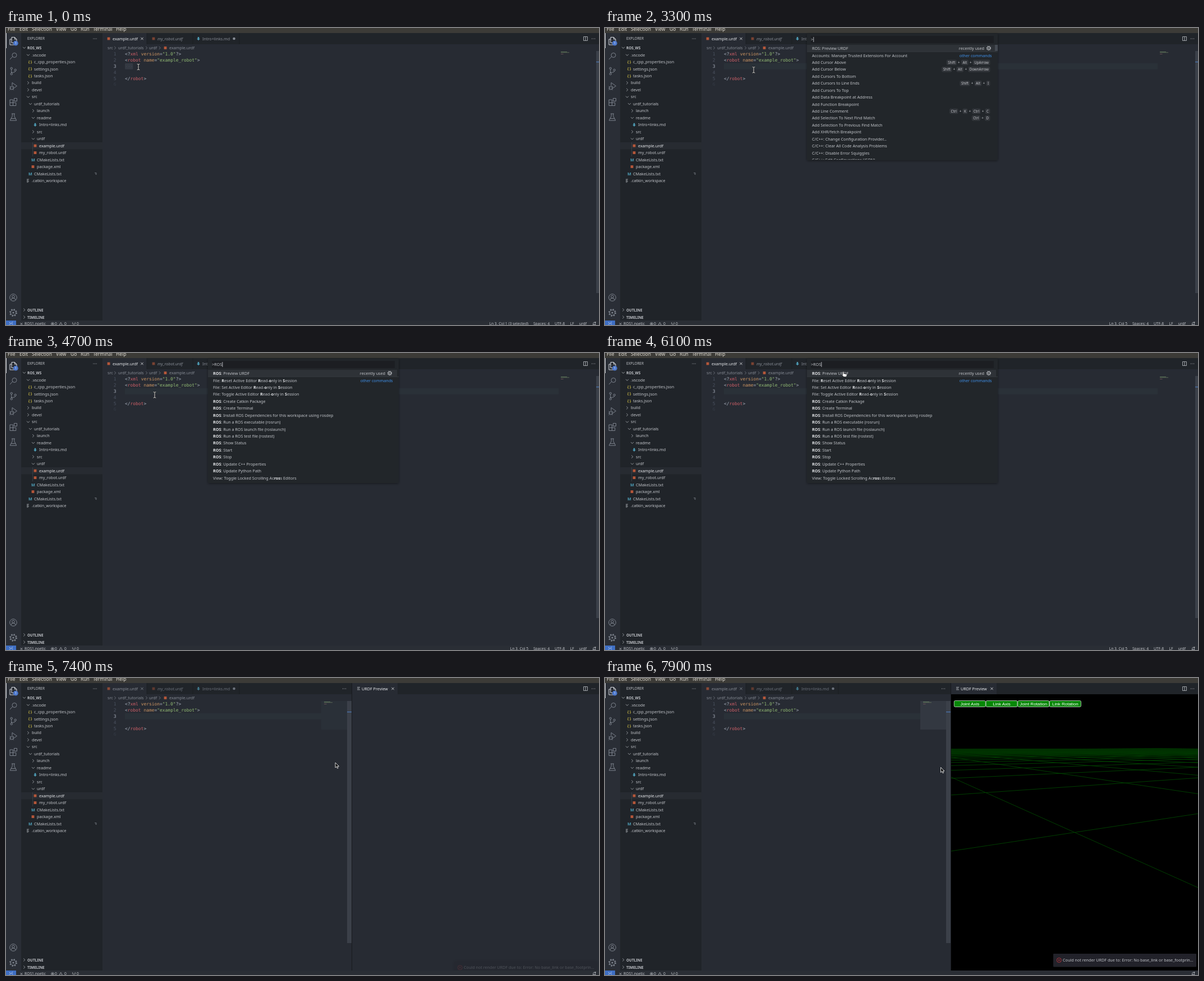
These frames come from a looping animation (1057x530 px, 8 s). An HTML page:

```html
<!DOCTYPE html>
<html lang="en">
<head>
<meta charset="utf-8">
<title>Editor preview</title>
<style>
html, body { margin: 0; width: 100%; height: 100%; overflow: hidden; background: #272b33; }
svg { display: block; width: 1057px; height: 530px; }
text { font-family: "Noto Sans", "Open Sans", sans-serif; font-size: 7.2px; fill: #c1c4c9; white-space: pre; }
.code { font-family: "DejaVu Sans Mono", "Liberation Mono", monospace; font-size: 7.93px; }
.btn { font-family: "Liberation Sans", sans-serif; font-size: 8px; fill: #fff; }
</style>
</head>
<body>
<svg id="stage" viewBox="0 0 1057 530">
  <defs>
    <filter id="shadow" x="-10%" y="-10%" width="120%" height="125%">
      <feDropShadow dx="0" dy="1" stdDeviation="2" flood-color="#000" flood-opacity=".45"/>
    </filter>
    <linearGradient id="haze" x1="0" y1="0" x2="0" y2="1">
      <stop offset="0" stop-opacity=".4"/><stop offset="1" stop-opacity="0"/>
    </linearGradient>
    <clipPath id="listClip"><rect x="360" y="28" width="340" height="207"/></clipPath>
    <clipPath id="viewClip"><rect x="617" y="29" width="440" height="493"/></clipPath>
    <clipPath id="bodyClip"><rect width="1057" height="522"/></clipPath>
  </defs>
  <g id="base"></g>
  <g id="live"></g>
</svg>
<script>
const LOOP = 8000, STEP = 100;
const C = {
  editor: '#272b33', side: '#202429', activity: '#2a2e36', menu: '#3c3b37', row: '#272b31',
  status: '#2a2e35', popup: '#24272b', text: '#c1c4c9', bright: '#e6e8eb', dim: '#868b94', faint: '#6b717b',
  orange: '#b5573a', blue: '#3f8fe8', teal: '#4d9cb5', yellow: '#c2b243'
};
const esc = s => s.replace(/&/g, '&amp;').replace(/</g, '&lt;').replace(/>/g, '&gt;');
const rect = (x, y, w, h, fill, more = '') =>
  `<rect x="${x}" y="${y}" width="${w}" height="${h}" fill="${fill}" ${more}/>`;
const path = (d, stroke, w = 0.8, more = '') =>
  `<path d="${d}" fill="none" stroke="${stroke}" stroke-width="${w}" ${more}/>`;
const dot = (x, y, r, fill, more = '') => `<circle cx="${x}" cy="${y}" r="${r}" fill="${fill}" ${more}/>`;
const raw = (x, y, inner, fill = C.text, more = '') => `<text x="${x}" y="${y}" style="fill:${fill}" ${more}>${inner}</text>`;
const text = (x, y, s, fill, more) => raw(x, y, esc(s), fill, more);
const sized = (x, y, s, size, fill = C.text, extra = '') =>
  `<text x="${x}" y="${y}" style="fill:${fill};font-size:${size}px;${extra}">${esc(s)}</text>`;
const at = (x, y, inner) => `<g transform="translate(${x} ${y})">${inner}</g>`;
const bold = s => esc(s).replace(/\*([^*]+)\*/g, '<tspan font-weight="700" fill="#e4e6e9">$1</tspan>');

const chevron = (x, y, open, col = C.text) =>
  path(open ? `M${x - 2.5} ${y - 1.2}l2.5 2.6l2.5-2.6` : `M${x - 1.3} ${y - 2.5}l2.6 2.5l-2.6 2.5`, col, 0.7);
const cross = (x, y, r = 2.2, col = C.text) =>
  path(`M${x - r} ${y - r}l${2 * r} ${2 * r}m0 ${-2 * r}l${-2 * r} ${2 * r}`, col, 0.8);
const dots = (x, y) => [-2.6, 0, 2.6].map(d => dot(x + d, y, 0.6, C.text)).join('');
const gear = (x, y, r, col) =>
  dot(x, y, r * 0.72, 'none', `stroke="${col}" stroke-width=".9"`) +
  dot(x, y, r * 0.9, 'none', `stroke="${col}" stroke-width="${r * 0.35}" stroke-dasharray="${r * 0.35} ${r * 0.357}"`) +
  dot(x, y, r * 0.25, col);

const fileIcons = {
  feed: (x, y) => rect(x - 2.4, y - 2.4, 4.8, 4.8, C.orange),
  json: (x, y) => sized(x - 3.2, y + 2.3, '{ }', 6.6, C.yellow, 'font-weight:700;letter-spacing:-.2px'),
  md: (x, y) => `<path d="M${x - 1.3} ${y - 3}h2.6v3h1.6l-2.9 3.2l-2.9-3.2h1.6z" fill="${C.teal}"/>`,
  cmake: (x, y) => sized(x - 3.1, y + 2.6, 'M', 7.2, C.teal, 'font-weight:700'),
  plain: (x, y) => path(`M${x - 2} ${y - 2.5}h4m-4 1.7h3m-3 1.7h4m-4 1.7h3`, C.text, 0.7)
};

// [label x, label, icon or folder state]
const tree = [
  [46, '.vscode', 'open'], [50, 'c_cpp_properties.json', 'json'], [50, 'settings.json', 'json'],
  [50, 'tasks.json', 'json'], [46, 'build', 'shut'], [46, 'devel', 'shut'], [46, 'src', 'open'],
  [50, 'urdf_tutorials', 'open'], [55, 'launch', 'shut'], [55, 'readme', 'open'],
  [59, 'Intro+links.md', 'md'], [55, 'src', 'shut'], [55, 'urdf', 'open'],
  [59, 'example.urdf', 'feed'], [59, 'my_robot.urdf', 'feed'], [55, 'CMakeLists.txt', 'cmake'],
  [55, 'package.xml', 'feed'], [50, 'CMakeLists.txt', 'cmake'], [46, '.catkin_workspace', 'plain']
];
const selected = 13;

function activityBar() {
  const g = '#7d838d', line = (x, y, d, col = g) => at(x, y, path(d, col, 1));
  return rect(0, 9, 27, 513, C.activity) + rect(0, 9, 1, 27, '#d7dae0') +
    line(13, 23, 'M-3-3v-3.5h5.5l3.5 3.5v6.5h-9zM2.5-6.5v3.5h3.5M-3-3h-3v10h8v-3.5', '#d7dae0') +
    dot(17.3, 27.2, 4.4, '#4d78cc') + sized(15.9, 29.3, '1', 5.2, '#fff') +
    line(13, 50, 'M-6 6l4.5-4.8M-2-1.5a4 4 0 1 0 8 0a4 4 0 1 0-8 0') +
    line(13, 77, 'M-5-5a1.7 1.7 0 1 0 3.4 0a1.7 1.7 0 1 0-3.4 0M-3.3-3.3v6.6M-5 5a1.7 1.7 0 1 0 3.4 0a1.7 1.7 0 1 0-3.4 0M2-2a1.7 1.7 0 1 0 3.4 0a1.7 1.7 0 1 0-3.4 0M3.7-.3q0 2.8-7 2.8') +
    line(13, 104, 'M-2-1v-5.5l8.5 6l-6 4M-5 3a2.5 3 0 1 0 5 0a2.5 3 0 1 0-5 0M-6.5 0l2 1.3m-2.5 2h2m-1.5 3.2l2-1.4m5.5-5l-2 1.2m2.5 2h-2m1.5 3.2l-2-1.4') +
    line(13, 132, 'M-6-4h5.5v10.5h-5.5zM-6 1.2h10.8v5.3h-5.3M1.5-6.5h5v5h-5z') +
    line(13, 159, 'M-3-6h6M-1.8-6v4.5l-4 7.5h11.6l-4-7.5v-4.5M-4 2.5h8') +
    line(13, 481, 'M-6.3 0a6.3 6.3 0 1 0 12.6 0a6.3 6.3 0 1 0-12.6 0M-2.3-1.5a2.3 2.3 0 1 0 4.6 0a2.3 2.3 0 1 0-4.6 0M-4.2 4.7q.6-3.8 4.2-3.8t4.2 3.8') +
    gear(13, 508, 6.4, g);
}

function sidebar() {
  let s = rect(27, 9, 145, 513, C.side) + sized(38, 21.3, 'EXPLORER', 6.4) + dots(158.5, 19) +
    rect(27, 204, 145, 12.4, C.row) + path('M47.5 204v25', '#484d55', 0.6);
  for (const [y, name, open] of [[35, 'ROS_WS', true], [503, 'OUTLINE'], [516, 'TIMELINE']])
    s += chevron(32.5, y, open) + sized(38, y + 2.5, name, 6.4, C.text, 'font-weight:700');
  tree.forEach(([x, name, kind], i) => {
    const y = 48 + i * 12.47;
    s += text(x, y + 2.6, name, i === selected ? C.bright : C.text) +
      (fileIcons[kind] ? fileIcons[kind](x - 7, y) : chevron(x - 6.5, y, kind === 'open'));
  });
  return s + path('M158 258.5h3v3m-2-1.5l2 1.8', C.dim, 0.7);
}

function statusLeft() {
  return rect(0, 522, 1057, 8, C.status) + rect(0, 522, 18, 8, '#3f6fc4') +
    path('M6 525l2.3 2.3l-2.3 2.3m6-5.2l-2.3 2.3l2.3 2.3', '#dfe6f5', 0.8) +
    cross(27.5, 528, 1.8) + sized(33, 530.2, 'ROS1.noetic', 6.7) +
    dot(83, 528, 2.4, 'none', `stroke="${C.text}" stroke-width=".7"`) + cross(83, 528, 1) +
    sized(87, 530.2, '0', 6.7) + path('M95 530.2l2.7-4.9l2.7 4.9z', C.text, 0.7) + sized(104, 530.2, '0', 6.7) +
    path('M119 525q-1 2 0 4m4-4q1 2 0 4m-2-2v4', C.text, 0.7) + sized(126, 530.2, '0', 6.7);
}

function drawBase() {
  const menu = [[3, 'File'], [24, 'Edit'], [46, 'Selection'], [89, 'View'], [115, 'Go'], [133, 'Run'],
    [155, 'Terminal'], [196, 'Help']];
  return rect(0, 0, 1057, 530, C.editor) + activityBar() + sidebar() +
    rect(0, 0, 1057, 9, C.menu) + menu.map(([x, s]) => sized(x, 4.9, s, 8.45, '#dfdbd2')).join('') +
    statusLeft();
}

const lineY = n => 46.6 + (n - 1) * 10.8;
function code(x, n, parts) {
  const spans = parts.map(([s, col]) => `<tspan fill="${col}">${esc(s)}</tspan>`).join('');
  return raw(x, lineY(n) + 2.8, spans, C.text, 'class="code"');
}

function tabs(split) {
  const t1 = split ? C.dim : C.bright, t2 = split ? C.faint : C.dim;
  let s = rect(172, 9, 885, 20, C.side) + rect(172, 9, 79, 20, C.editor) +
    path('M251 9v20M333 9v20M416 9v20', '#1a1d21', 0.6) +
    `<g opacity="${split ? 0.7 : 1}">${fileIcons.feed(183, 19)}<g opacity=".6">${fileIcons.feed(263, 19)}</g>${fileIcons.md(343, 19)}</g>` +
    text(190, 21.6, 'example.urdf', t1) + cross(242.5, 19, 2.2, t1) +
    text(270, 21.6, 'my_robot.urdf', t2, 'font-style="italic"') +
    text(350, 21.6, 'Intro+links.md', t2) + dot(406.5, 19, 2.3, t2);
  if (split) s += dots(603, 19) + rect(617, 9, 81, 20, C.editor) + path('M616.5 9v513', '#181a1f', 1) +
    path('M626 16.5h5m-5 2.2h4m-4 2.2h5', C.text, 0.8) + text(634, 21.6, 'URDF Preview', C.bright) +
    cross(689.5, 19, 2.2, C.bright);
  return s + path('M1029.5 15.5h7v7h-7zM1033 15.5v7', C.text, 0.8) + dots(1047, 19);
}

function editor(t, split) {
  const edited = t >= 400, end = split ? 562 : 985, gray = '#abb2bf', red = '#cf6068';
  const green = '#93bd75', orange = '#cc9563';
  let s = text(181, 38, 'src', C.dim) + chevron(194.5, 35.5, false, C.dim) + text(200, 38, 'urdf_tutorials', C.dim) +
    chevron(250.5, 35.5, false, C.dim) + text(255, 38, 'urdf', C.dim) + chevron(274, 35.5, false, C.dim) +
    fileIcons.feed(284, 35.5) + text(291, 38, 'example.urdf', C.dim);
  s += edited ? rect(212, 63, end - 212, 10.8, '#2a3138') : rect(212, 63, 14.3, 10.8, '#343942', 'rx="1"');
  if (!edited) for (let i = 0; i < 3; i++) s += dot(214.4 + i * 4.77, 68.4, 0.5, '#484e58');
  for (let n = 1; n <= 6; n++)
    s += text(196.5, lineY(n) + 2.8, String(n), n === 3 ? '#a4abb7' : n === 6 ? '#343a45' : '#4b5261', 'class="code" text-anchor="end"');
  s += code(212, 1, [['<?', gray], ['xml', red], [' version', orange], ['=', gray], ['"1.0"', green], ['?>', gray]]) +
    code(212, 2, [['<', gray], ['robot', red], [' name', orange], ['=', gray], ['"example_robot"', green], ['>', gray]]) +
    code(212, 5, [['</', gray], ['robot', red], ['>', gray]]);
  if (edited && t < 2100 && (t < 900 || (t >= 1400 && t < 1900))) s += rect(231, 63, 1, 10.8, '#528bff');

  const mx = split ? 567 : 989;
  if (split) s += rect(562, 41, 46, 51, '#3a3f49', `opacity="${t >= 7500 ? 0.65 : t >= 7400 ? 0.22 : 0}"`);
  s += rect(mx, 42, 11, 0.8, '#5f7a5c') + rect(mx, 43.4, 15, 0.8, '#66755c') + rect(mx, 46, 4.5, 0.8, '#74565c');
  s += split
    ? rect(608, 41, 8, 432, '#3b4049') + rect(608, 60, 8, 1.2, '#4a78b8')
    : rect(1052, 41, 5, 432, '#3b4049') + rect(1052, 60, 5, 1.2, '#4a78b8');
  return s;
}

function statusRight(t, split) {
  let s = path('M1046 529.5h5l-.8-1.2v-2q-1.7-2.4-3.4 0v2z', C.text, 0.8) + dot(1050.5, 525.3, 1, C.text);
  if (split) return s;
  const pos = t < 400 ? 'Ln 3, Col 1 (3 selected)' : 'Ln 3, Col 5';
  for (const [x, label] of [[931, pos], [969, 'Spaces: 4'], [996, 'UTF-8'], [1012.5, 'LF'], [1035, 'urdf']])
    s += sized(x, 530.2, label, 6.7, C.text, 'text-anchor:end');
  return s;
}

const up = ['Shift', 'Alt', 'UpArrow'], down = ['Shift', 'Alt', 'DownArrow'];
const allCommands = [
  ['ROS: Preview URDF'], ['Accounts: Manage Trusted Extensions For Account'], ['Add Cursor Above', up],
  ['Add Cursor Below', down], ['Add Cursors To Bottom'], ['Add Cursors to Line Ends', ['Shift', 'Alt', 'I']],
  ['Add Cursors To Top'], ['Add Data Breakpoint at Address'], ['Add Function Breakpoint'],
  ['Add Line Comment', ['Ctrl', 'K', 'Ctrl', 'C']], ['Add Selection To Next Find Match', ['Ctrl', 'D']],
  ['Add Selection To Previous Find Match'], ['Add XHR/fetch Breakpoint'],
  ['C/C++: Change Configuration Provider...'], ['C/C++: Clear All Code Analysis Problems'],
  ['C/C++: Disable Error Squiggles'], ['C/C++: Edit Configurations (JSON)'], ['C/C++: Edit Configurations (UI)'],
  ['C/C++: Enable Error Squiggles']
];
const rCommands = allCommands.filter(([s]) => /r/i.test(s)).map(([s, keys]) => [s.replace(/R/, '*R*'), keys]);
const fileCommands = ['*R*eset', 'Set', 'Toggle'].map(verb =>
  [`File: ${verb} Active Editor *R*ead-*o*nly in *S*ession`]);
const rosCommands = [
  ['*ROS*: Preview URDF'], ...fileCommands,
  ...['Create Catkin Package', 'Create Terminal', 'Install ROS Dependencies for this workspace using rosdep',
    'Run a ROS executable (rosrun)', 'Run a ROS launch file (roslaunch)', 'Run a ROS test file (rostest)',
    'Show Status', 'Start', 'Stop', 'Update C++ Properties', 'Update Python Path'].map(s => ['*ROS*: ' + s]),
  ['View: Toggle Locked Scrolling Ac*ros*s Editors']
];

const pen = document.createElement('canvas').getContext('2d');
function measure(s, size) {
  pen.font = `${size * 10}px "Noto Sans", "Open Sans", sans-serif`;
  return pen.measureText(s).width / 10;
}

function keyChips(keys, y) {
  let s = '', x = 686;
  [...keys].reverse().forEach((key, i) => {
    const w = measure(key, 6.2) + 4;
    x -= w;
    s += rect(x, y - 4.3, w, 8.6, '#32353a', 'rx="1.5" stroke="#3d4146" stroke-width=".5"') + sized(x + 2, y + 2.2, key, 6.2);
    if (i < keys.length - 1) s += sized(x - 6.3, y + 2.2, '+', 6.2);
    x -= 9;
  });
  return s;
}

function palette(t) {
  const typed = t < 4400 ? '>' : t < 4600 ? '>R' : t < 4700 ? '>RO' : '>ROS';
  const list = t < 4400 ? allCommands : t < 4600 ? rCommands : rosCommands;
  const flips = [2800, 3300, 3900, 4400, 5300, 5800, 6300];
  const caretOn = flips.filter(f => t >= f).length % 2 === 0;
  let rows = rect(360, 30, 337, 12, '#2e3237') + path('M360 42.4h340', '#41454b', 0.6);
  list.slice(0, 17).forEach(([label, keys], i) => {
    const y = i ? 49 + (i - 1) * 12.43 : 36;
    rows += raw(369, y + 2.6, bold(label)) + (keys ? keyChips(keys, y) : '');
  });
  rows += text(676, 38.6, 'recently used', C.text, 'text-anchor="end"') + gear(684, 36, 3.8, C.text) +
    text(689.5, 51.6, 'other commands', C.blue, 'text-anchor="end"');
  if (t >= 2500 && t < 4600) rows += rect(695, 30, 5, 11, '#454a52');
  return rect(360, 10, 340, list === rosCommands ? 222 : 226, C.popup, 'rx="2" filter="url(#shadow)"') +
    rect(367, 14, 326, 13, '#1c1e22') + text(367, 23, typed) +
    (caretOn ? rect(367 + measure(typed, 7.2) + 0.3, 16, 0.8, 9, '#d7dae0') : '') +
    `<g clip-path="url(#listClip)">${rows}</g>`;
}

// Square ground grid in perspective; a and b are its two directions on the floor.
function gridPath() {
  const cx = 837, horizon = 124, depth = 151.5, focal = 580.8, gap = 1.02, count = 50, near = 0.3;
  const a = [-0.503, 0.864], b = [0.864, 0.503], reach = gap * count;
  const project = ([x, z]) => `${(cx + focal * x / z).toFixed(1)} ${(horizon + depth / z).toFixed(2)}`;
  let d = '';
  for (const [dir, side] of [[a, b], [b, a]])
    for (let i = -count; i <= count; i++) {
      const ox = side[0] * gap * i, oz = 1 + side[1] * gap * i;
      const from = Math.max(-reach, (near - oz) / dir[1]);
      if (from >= reach) continue;
      const p = k => project([ox + dir[0] * k, oz + dir[1] * k]);
      d += `M${p(from)}L${p(reach)}`;
    }
  return d;
}
const grid = gridPath();

function preview() {
  let s = rect(617, 29, 440, 493, '#000') + path(grid, '#004600', 0.9, 'clip-path="url(#viewClip)"') +
    rect(617, 122, 440, 26, 'url(#haze)');
  ['Joint Axis', 'Link Axis', 'Joint Rotation', 'Link Rotation'].forEach((label, i) => {
    const x = 622.3 + i * 56.7;
    s += rect(x, 40.5, 56, 11, '#078707', 'rx="2" stroke="#d5e6d5" stroke-width=".8"') +
      text(x + 28, 48.9, label, '#fff', 'class="btn" text-anchor="middle"');
  });
  return s;
}

function notice(t) {
  const dy = t < 7500 ? 13.3 : t < 7600 ? 1 : 0, alpha = t < 7500 ? 0.25 : t < 7600 ? 0.9 : 1;
  return `<g clip-path="url(#bodyClip)"><g transform="translate(0 ${dy})" opacity="${alpha}">` +
    rect(799, 492, 255, 23.5, '#202429', 'rx="1" filter="url(#shadow)"') +
    dot(809.3, 503.5, 4, 'none', 'stroke="#c8383f" stroke-width=".8"') + cross(809.3, 503.5, 1.6, '#c8383f') +
    text(816, 506.2, 'Could not render URDF due to: Error: No base_link or base_footprin…') + '</g></g>';
}

// [time, x, y]
const track = [
  [0, 236, 69.5], [900, 236, 69.5], [1000, 236.6, 69.5], [1300, 236.6, 69.5], [1400, 265, 74.8],
  [5400, 265, 74.8], [5500, 269, 74], [5800, 355, 52], [6100, 425, 33.5], [6300, 425, 33.5],
  [6500, 413, 33.5], [6800, 413, 33.5], [7000, 465, 72], [7200, 548, 126], [7400, 587, 151],
  [7500, 587.5, 157], [7900, 598.5, 159.5], [8000, 598.5, 159.5]
];
function pointer(t) {
  const i = track.findIndex(p => p[0] > t), [t0, x0, y0] = track[i - 1], [t1, x1, y1] = track[i];
  const k = (t - t0) / (t1 - t0), x = x0 + (x1 - x0) * k, y = y0 + (y1 - y0) * k;
  if (x > 562)
    return at(x, y, '<path d="M0 0v9l2.1-1.9l1.5 3.2l1.5-.7l-1.5-3.1h2.9z" fill="#111" stroke="#fff" stroke-width=".8"/>');
  if (x > 360 && t < 6900)
    return at(x, y, '<path d="M-1 0q1-.9 1.8 0v3.2l4.4 1q1.2.4.9 1.7l-1 3.1h-4.6l-3-3.4q0-1.2 1.5-.5z" fill="#fff" stroke="#222" stroke-width=".6"/>');
  const beam = 'M-2.3-5.2q1.8 0 2.3.8q.5-.8 2.3-.8M0-4.4v8.8M-2.3 5.2q1.8 0 2.3-.8q.5.8 2.3.8';
  return at(x, y, path(beam, '#111', 2.2) + path(beam, '#e8e8e8', 1));
}

const live = document.getElementById('live');
document.getElementById('base').innerHTML = drawBase();

function draw(t) {
  const split = t >= 6800;
  live.innerHTML = tabs(split) + editor(t, split) + statusRight(t, split) +
    (t >= 2100 && t < 6700 ? palette(t) : '') +
    (t >= 7500 ? preview() : '') + (t >= 7400 ? notice(t) : '') + pointer(t);
}

let shown = -1;
const start = performance.now();
function tick() {
  const t = Math.floor((performance.now() - start) % LOOP / STEP) * STEP;
  if (t !== shown) draw(shown = t);
  requestAnimationFrame(tick);
}
tick();
</script>
</body>
</html>
```
